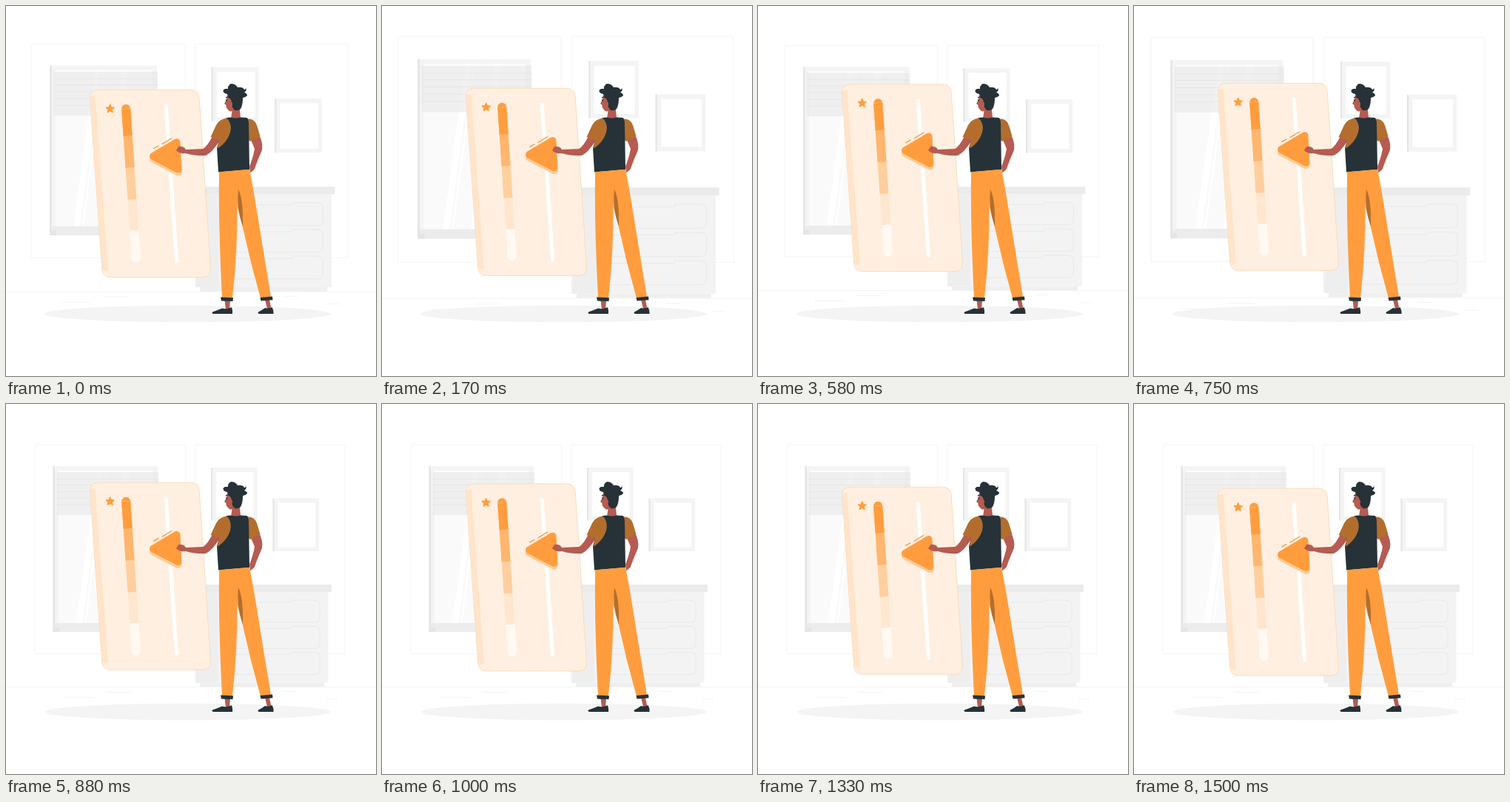
Recreate the animation shown at these times as an HTML page. Size 500 px wide and 500 px high, loop 1.54 s.

```html
<!DOCTYPE html>
<html lang="en">
<head>
<meta charset="utf-8">
<title>Slider card</title>
<style>
  html, body { margin: 0; height: 100%; overflow: hidden; background: #fff; }
  svg { display: block; width: 100vw; height: 100vh; }
  .orange { fill: #ff9d3e; }
  .brown { fill: #b36e2e; }
  .dark { fill: #263238; }
  .skin { fill: #b55b52; }
  .line { fill: none; stroke: #f4f4f4; }
  .edge { fill: #e5e5e5; }
  .frame { fill: #f4f4f4; }
</style>
</head>
<body>
<svg viewBox="0 0 500 500">
  <defs>
    <g id="picture">
      <path class="frame" d="M0 0H62.5V71.5H0Z"/>
      <path class="edge" d="M0 0H2V71.5H0Z"/>
      <path fill="#fff" d="M7 6H57.500V66H7Z"/>
    </g>
    <path id="drawer" fill="none" stroke="#e9e9e9"
      d="M289 3H384.500V0H417Q424 0 424 7V23Q424 30 417 30H289"/>
    <path id="arrow" stroke-width="10" stroke-linejoin="round" d="M199 203.500L230.500 184.700L232.500 221Z"/>
  </defs>

  <g id="room">
    <path class="line" d="M39 55.500H242.500V337.500H39ZM255.500 55.500H458V337.500H255.500Z"/>
    <path class="line" stroke="#eee" d="M0 382.500H500"/>
    <path class="line" d="M78 396.500H119M135 389.500H168M374 388.500H391M432 398.500H448"/>

    <path class="frame" fill="#f0f0f0" d="M63.500 84H205V308H63.500Z"/>
    <path class="edge" d="M63.500 84H66V308H63.500Z"/>
    <path fill="#ececec" d="M66 296H205V308H66Z"/>
    <path class="edge" d="M63.500 302H72V308H63.500Z"/>
    <path fill="#fafafa" d="M71 90H198V296H71Z"/>
    <path fill="#fff" d="M95 296H103L131 90H123ZM106 296H108L136 90H134ZM130 296H140L168 90H158Z"/>
    <path fill="#e8e8e8" opacity=".62" d="M68.500 92H206V150H68.500Z"/>
    <path stroke="#fff" stroke-width="1.500" opacity=".75" d="M71 91H198"/>
    <path stroke="#e4e4e4" stroke-width="1" opacity=".7"
      d="M69 101.500H206M69 109.500H206M69 118.500H206M69 127.500H206M69 136.500H206"/>

    <use href="#picture" x="277" y="86"/>
    <use href="#picture" x="360.500" y="127.500"/>

    <path fill="#f3f3f3" d="M256 254H435.500V376.500H256Z"/>
    <path fill="#eee" d="M256 254H286.500V376.500H256Z"/>
    <path fill="#efefef" d="M262 376.500H430V382H262Z"/>
    <path fill="#ebebeb" d="M251 244H440V254H251Z"/>
    <use href="#drawer" y="265"/>
    <use href="#drawer" y="300.300"/>
    <use href="#drawer" y="335.500"/>
  </g>

  <ellipse cx="245" cy="416" rx="193.500" ry="11.300" fill="#f4f4f4"/>

  <g id="card">
    <path fill="#ffefe0" stroke="#fbdcbd" d="M125 114H249Q260.500 114 261.200 125L276.500 355Q277 367 265.500 367H141.500Q130.500 367 129.700 356L113.500 125Q113 114 125 114Z"/>
    <path fill="#ffe4c9" d="M114 123Q116 121 120.500 122L138 357Q134 360 130.200 356Z"/>
    <path id="star" class="orange" stroke="#ff9d3e" stroke-width="1.500" stroke-linejoin="round"/>
    <g id="bar" stroke-width="12"></g>
    <path stroke="#fff" stroke-width="5" stroke-linecap="round" d="M216.300 136L230.500 345"/>
    <use href="#arrow" y="3.800" fill="#fbcb98" stroke="#fbcb98"/>
    <use href="#arrow" class="orange" stroke="#ff9d3e"/>
    <path stroke="#ee8f35" stroke-width="1.200" stroke-linecap="round" d="M199.500 193L206 189.500M211 187L223.500 179.500"/>
  </g>

  <g id="person">
    <path class="skin" d="M331 181L343 176Q348 188 345.500 196Q340 208 335.500 221L330 225.500L329 217Q334 204 336 193Z"/>
    <path class="skin" d="M279 176Q272 190 266 193L243 194Q240 189 233 190L230 195Q234 200 243 199Q258 203 270 202Q279 198 290 180Z"/>
    <path class="skin" d="M299 119L298 126L295 132L297.500 134Q297 137 299 139Q302 143.500 305.500 142L304 152Q310 155 317 151L315.500 135L310 118Z"/>
    <path class="dark" d="M300 124Q301 120 299 119Q293 118 293.500 114Q295 111 300 112Q299 108 304 105Q310 105 313 110Q320 109 322 113Q324 113 324 110.500Q326 114 322 117Q326 118 326 121Q323 124 320 124Q320 134 317 139Q312 143 308 140Q305 137 304.500 128Q303 124 300 124Z"/>
    <path class="skin" d="M306 131Q302 126 301.500 130Q303 134 306 134Z"/>
    <path class="dark" d="M297.500 126H299V128.500H297.500ZM296.500 123.500L300 122V123.200L297 124.600Z"/>
    <path class="brown" d="M326 152.500Q336 152 339 161L343.500 176L330 183L326 180Z"/>
    <path class="dark" d="M297 151.500Q304 150 306 151Q311 152 317 150.500L325.500 151Q328 153 328 160L329 221L287 224.500L285 192Z"/>
    <path class="brown" d="M298 151.500Q288 153 284 161L276.500 177L288 181.500L285.500 193Q302 182 303.800 166Q304 156 298 151.500Z"/>
    <path class="orange" d="M288 224.300L329 220.800Q335 250 344 308L358 393L344 395Q330 346 319.500 297L312.500 271Q313 330 306 394.500H292Q287 300 288 224.300Z"/>
    <path class="brown" d="M314 248Q321 262 320 298Q311 272 314 248Z"/>
    <path class="skin" d="M295.500 398H303L302 410H297ZM350 397H356L358.500 409H353Z"/>
    <path class="dark" d="M290 393.500L307 394.300L306.500 399L291 398.500ZM343.500 394L360 392.500L360.500 397.300L344.500 398.500Z"/>
    <path class="dark" d="M279 413.500Q286 411 292 408.500Q296 409.500 299 409L305 407.200Q306.500 411 306 416H281Q277.500 416 279 413.500ZM341 413.500Q346 411 350 408Q355 409.500 359.500 407Q362 411 361.500 416H343Q339.500 416 341 413.500Z"/>
  </g>
</svg>
<script>
  const LOOP = 1540, CYCLE = 1500, STEP = 1000 / 24, LEAD = 36;
  const $ = id => document.getElementById(id);

  // Five-pointed star
  $('star').setAttribute('d', 'M' + Array.from({ length: 10 }, (_, i) => {
    const r = i % 2 ? 2.6 : 5.6, a = i * Math.PI / 5 - Math.PI / 2;
    return `${140.7 + r * Math.cos(a)} ${139.5 + r * Math.sin(a)}`;
  }).join('L') + 'Z');

  // Level bar, drawn bottom up so each shorter segment covers the last
  const barX = y => 162.2 + (y - 139.5) * 0.068;
  const segments = [[341, '#fff9f3'], [304, '#ffe6ce'], [262, '#ffcf9e'], [219, '#ffb66e'], [176, '#ff9d3e']];
  const line = (y1, y2, color, cap) =>
    `<path d="M${barX(y1)} ${y1}L${barX(y2)} ${y2}" stroke="${color}" stroke-linecap="${cap}"/>`;
  $('bar').innerHTML = line(300, 341, segments[0][1], 'round') +
    line(139.5, 150, segments[4][1], 'round') +
    segments.map(([y, color]) => line(139.5, y, color, 'butt')).join('');

  // Linear interpolation through [position, value] keys
  function track(keys, p) {
    const i = Math.max(1, keys.findIndex(k => k[0] >= p));
    const [[p0, v0], [p1, v1]] = [keys[i - 1], keys[i]];
    return v0 + (v1 - v0) * (p - p0) / (p1 - p0);
  }
  const beat = [[0, 1], [.1, 1.1], [.3, 1], [.4, 1], [.5, 1.1], [.6, 1], [1, 1]];
  const float = [[0, 0], [.5, -10], [1, 0]];

  function draw(now) {
    const tick = Math.floor((now % LOOP + 5) / STEP);
    const p = Math.min(tick * STEP + LEAD, CYCLE) / CYCLE;
    $('room').setAttribute('transform', `translate(250 229) scale(${track(beat, p)}) translate(-250 -229)`);
    $('card').setAttribute('transform', `translate(0 ${track(float, p)})`);
  }

  let start;
  function loop(now) {
    start ??= now;
    draw(now - start);
    requestAnimationFrame(loop);
  }
  draw(0);
  requestAnimationFrame(loop);
</script>
</body>
</html>
```
